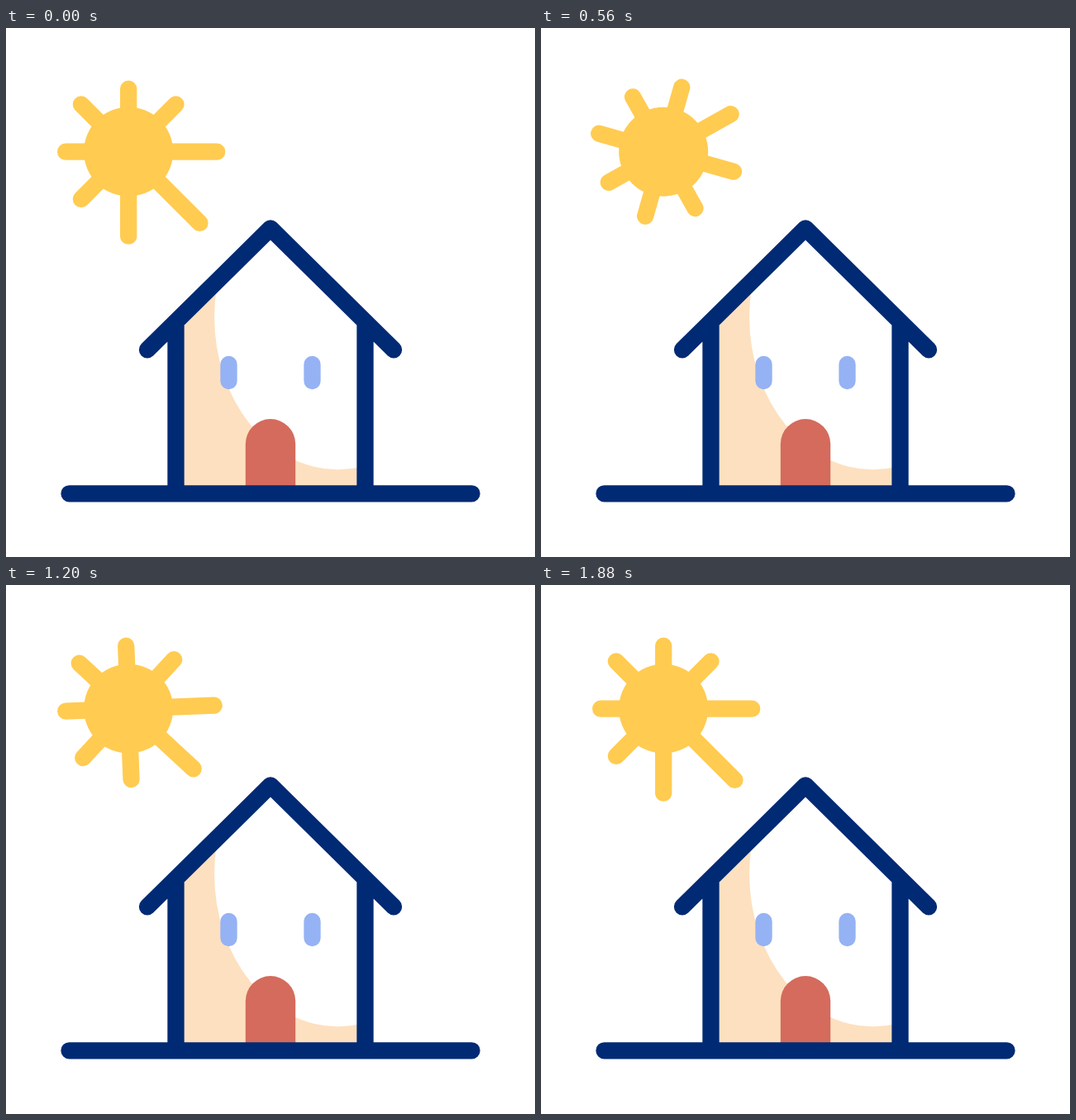
Animation of 640x640 px, one loop 2 s. Source, as an HTML page:

```html
<!DOCTYPE html>
<html lang="en">
<head>
<meta charset="utf-8">
<title>Sun and house</title>
<style>
  html, body { margin: 0; height: 100%; overflow: hidden; background: #fff; }
  svg { display: block; width: 100vw; height: 100vh; }
</style>
</head>
<body>
<svg viewBox="0 0 640 640" fill="none" stroke-width="20.3" stroke-linecap="round" stroke-linejoin="round">
  <path fill="#fde0bf" d="M205 355L320 242L434 355V563H205Z"/>
  <ellipse fill="#fff" cx="401.8" cy="349.8" rx="149.7" ry="184.5"/>
  <path fill="#d46b5d" d="M289.8 563V503.3a30.2 30.2 0 0 1 60.4 0V563Z"/>
  <path stroke="#95b2f4" d="M269.5 407v20M370.5 407v20"/>
  <path stroke="#012a74" d="M171 389.3L320 242.3L469 389.3M205.5 356V563.3M434.5 356V563.3M76.5 563.3H563.5"/>
  <g transform="translate(148.2 149.7)">
    <circle r="54" fill="#ffcb51"/>
    <path id="rays" stroke="#ffcb51"/>
  </g>
</svg>
<script>
const LOOP = 2000, STEP = 40;
const rays = document.getElementById('rays');

// The sun rocks to and fro, less each time: [time, degrees]
const swing = [[80, 0], [480, -33], [940, 19], [1390, -15.2], [1910, 0]];

const wave = x => (1 - Math.cos(Math.PI * x)) / 2;

function tilt(t) {
  const next = swing.findIndex(key => key[0] > t);
  if (next < 1) return 0;
  const [t0, a0] = swing[next - 1], [t1, a1] = swing[next];
  return a0 + (a1 - a0) * wave((t - t0) / (t1 - t0));
}

// The three rays facing the house shrink and grow twice, one after another
function stretch(i, t) {
  const reach = [31, 41, 26][i] || 0;
  const begin = 250 + 130 * (1 - i), end = 1810 + 45 * (1 - i);
  const x = Math.min(1, Math.max(0, (t - begin) / (end - begin)));
  return reach * (1 - .92 * wave(4 * x));
}

function draw(t) {
  const turn = t < LOOP - 3 * STEP ? tilt(t) : 0;
  let path = '';
  for (let i = 0; i < 8; i++) {
    const angle = (i * 45 + turn) * Math.PI / 180;
    const length = (i % 2 ? 81 : 76) + stretch(i, t);
    path += `M0 0L${length * Math.cos(angle)} ${length * Math.sin(angle)}`;
  }
  rays.setAttribute('d', path);
}

const start = performance.now();
function tick() {
  const t = (performance.now() - start) % LOOP;
  draw(Math.floor(t / STEP) * STEP);
  requestAnimationFrame(tick);
}
tick();
</script>
</body>
</html>
```
